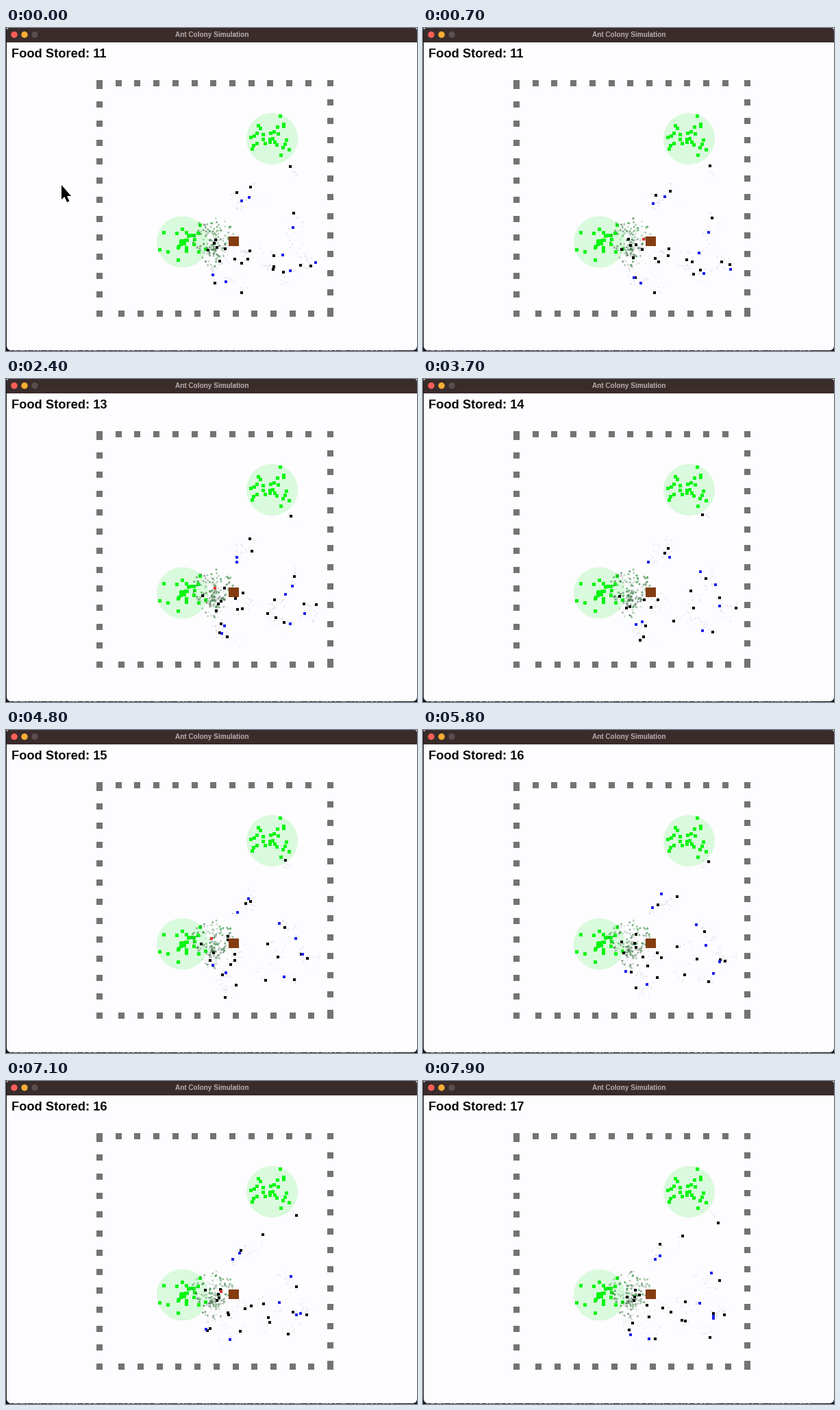
Write a matplotlib script that moves like this. It is 600 px wide and 471 px high and loops after 8 s.

```python
import numpy as np
import matplotlib.pyplot as plt
from matplotlib.animation import FuncAnimation
from matplotlib.patches import Circle, FancyBboxPatch, Polygon, Rectangle

W, H, DPI, FRAMES = 600, 471, 64, 80
PT = 72 / DPI  # points per pixel
rng = np.random.default_rng(11)

fig = plt.figure(figsize=(W / DPI, H / DPI), dpi=DPI, facecolor="#151314")
ax = fig.add_axes([0, 0, 1, 1])
ax.set_xlim(0, W)
ax.set_ylim(H, 0)
ax.axis("off")


def dots(points, px, color, marker="s", z=5):
    x, y = np.asarray(points, float).reshape(-1, 2).T
    return ax.scatter(x, y, s=(px * PT) ** 2, c=color, marker=marker,
                      linewidths=0, zorder=z)


def rect(x, y, w, h, color, z=1):
    ax.add_patch(Rectangle((x, y), w, h, fc=color, lw=0, zorder=z))


def rounded(x, y, w, h, r, color):
    ax.add_patch(FancyBboxPatch((x, y), w, h, lw=0, fc=color,
                                boxstyle=f"round,pad=0,rounding_size={r}"))


def disc(x, y, r, color):
    ax.add_patch(Circle((x, y), r, fc=color, lw=0, zorder=2))


def label(x, y, text, px, color, **kw):
    return ax.text(x, y, text, fontsize=px * PT, color=color, weight="bold",
                   family="Liberation Sans", zorder=6, **kw)


def scatter_in(center, spread, n, power=0.5):
    """Random points in an ellipse; power 1 packs them towards the middle."""
    r, a = rng.random(n) ** power, rng.uniform(0, 2 * np.pi, n)
    ring = np.column_stack([r * np.cos(a), r * np.sin(a)])
    return np.array(center) + ring * spread


# Window
rounded(1, -12, 599, 482, 7, "#fdfcfe")
for x in np.cumsum(rng.uniform(4, 11, 80)):
    rect(x, 470, rng.uniform(1, 4), 1, "#77757a")
rounded(1, 0, 599, 14, 4, "#392c2b")
rect(1, 6, 599, 15, "#392c2b")
for x, c in zip((12, 27, 42), ("#fb5f57", "#f8ad35", "#5a4f4e")):
    disc(x, 9.7, 4.7, c)
label(300.5, 13, "Ant Colony Simulation", 10, "#b7adac", ha="center")
score = label(8.5, 43, "", 18.2, "#080808")

# Walls: each side starts at its own corner
STEP, LEFT, TOP, RIGHT, BOTTOM = 27.7, 136.5, 80.5, 473.5, 416.5
for k in range(13):
    d = STEP * k
    sides = [(RIGHT, TOP + d), (LEFT, BOTTOM - d)]
    if k < 12:
        sides += [(LEFT + d, TOP), (RIGHT - d, BOTTOM)]
    for x, y in sides:
        rect(x - 4.5, y - 4.5, 9, 9, "#737373", 2)

# Food
for spot in ((388.5, 161.5), (257.5, 312)):
    disc(*spot, 37.5, "#d9fadc")
    dots(scatter_in(spot, 36, 28, 1), 5, "#08f512", z=3)

# Nest
rect(325, 304, 15, 14, "#843c10", 7)

# Pointer
tip = Polygon([(81, 229), (81, 250), (85.5, 246), (89, 254), (92.5, 252.5),
               (89, 245), (95, 245)], fc="black", ec="white", lw=2 * PT,
              zorder=8)
pointer = [ax.add_patch(tip),
           ax.add_patch(Polygon(tip.get_xy(), fc="black", lw=0, zorder=9))]
POINTER_GONE = 5

# Ant groups: centre, spread, black ants, blue ants
GROUPS = [((303, 314), (17, 20), 5, 0),
          ((340, 322), (16, 22), 4, 0),
          ((410, 326), (36, 42), 7, 4),
          ((324, 364), (30, 18), 3, 2),
          ((348, 250), (30, 20), 2, 2),
          ((415, 206), (6, 10), 1, 0)]
LEAD = 60  # steps walked before the first frame, to lay trails
steps = np.arange(-LEAD, FRAMES)[:, None, None]


def wander(homes):
    """Slow drift plus quicker wiggles around each home; (step, ant, xy)."""
    walk = np.zeros((len(steps), *homes.shape))
    for size, period in ((9, 95), (6, 50), (2.5, 22)):
        speed = 2 * np.pi / (period * rng.uniform(0.75, 1.25, homes.shape))
        walk += size * np.sin(steps * speed + rng.uniform(0, 6.3, homes.shape))
    return homes + walk


black = wander(np.vstack([scatter_in(c, s, n) for c, s, n, _ in GROUPS]))
blue = wander(np.vstack([scatter_in(c, s, n) for c, s, _, n in GROUPS]))

# Faint trails: one drop every four steps
DROP, TRAIL = 4, 9
drops = np.concatenate([black, blue], axis=1)[::DROP]
drops = drops + rng.normal(0, 1.8, drops.shape)

# Pheromone cloud between food and nest: a loose field and a denser core
cloud = np.vstack([scatter_in((302, 304), (31, 27), 170),
                   scatter_in((303, 322), (19, 28), 130, 0.8)])
M, LIFE = len(cloud), 90
born = rng.uniform(-LIFE, FRAMES, M)
mix = np.clip(rng.normal(0.55 - 0.3 * (cloud[:, 1] > 315), 0.3, M), 0, 1)
mix = mix[:, None]
cloud_rgb = (mix * (35, 160, 50) + (1 - mix) * (80, 105, 85)) / 255

trail_art = dots(drops[:TRAIL], 2.4, "#8c8c98", "o", 3)
cloud_art = dots(cloud, 3, "green", "o", 4)
black_art = dots(black[LEAD], 4.2, "#050505")
blue_art = dots(blue[LEAD], 4.2, "#1c22ee")
carrier = dots([(0, 0)], 4.4, "#e8302c")

# Food is carried home just before each count
DEPOSITS, TRIP = [9, 23, 30, 46, 55, 75], 8
EDGE, DOOR = np.array((296, 303)), np.array((331, 310))


def draw(i):
    now = LEAD + i
    black_art.set_offsets(black[now])
    blue_art.set_offsets(blue[now])

    last = now // DROP
    age = now - DROP * np.arange(last - TRAIL, last)
    trail_art.set_offsets(drops[last - TRAIL:last].reshape(-1, 2))
    fade = 0.22 * np.clip(1 - age / 42, 0, 1)
    trail_art.set_alpha(np.repeat(fade, drops.shape[1]))

    age = (i - born) / LIFE
    alpha = np.where((age >= 0) & (age < 1), 0.75 * (1 - 0.85 * age), 0)
    cloud_art.set_facecolors(np.column_stack([cloud_rgb, alpha]))

    left = min((d - i for d in DEPOSITS if d > i), default=FRAMES)
    carrier.set_visible(left <= TRIP)
    carrier.set_offsets([DOOR + (EDGE - DOOR) * left / TRIP])

    for part in pointer:
        part.set_visible(i < POINTER_GONE)
    score.set_text(f"Food Stored: {11 + sum(i >= d for d in DEPOSITS)}")
    return black_art, blue_art, trail_art, cloud_art, carrier, score, *pointer


anim = FuncAnimation(fig, draw, frames=FRAMES, interval=100, repeat=True,
                     repeat_delay=0, blit=False)
plt.show()
```
